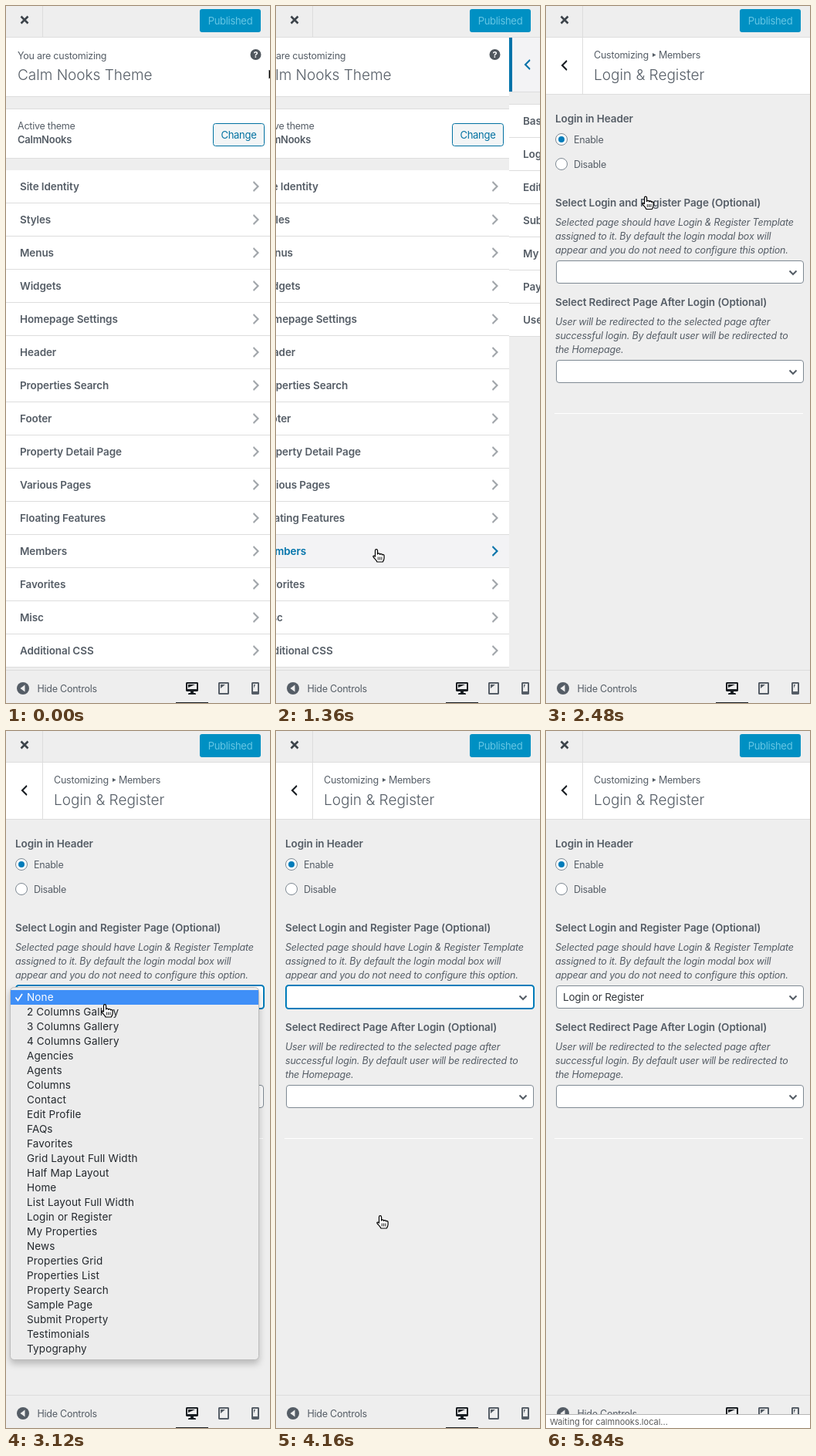
An HTML page for the animation above (6.24 s loop, 342 px wide and 904 px high).

```html
<!DOCTYPE html>
<html lang="en">
<head>
<meta charset="utf-8">
<title>Theme customizer</title>
<style>
  html, body { margin: 0; width: 100%; height: 100%; overflow: hidden; background: #eee; }
  svg { display: block; width: 342px; height: 904px; font-family: Inter, "Open Sans", sans-serif; font-optical-sizing: none; }
  text { fill: #555d66; white-space: pre; }
  .body { font-size: 12.5px; letter-spacing: -.24px; }
  .desc { font-size: 12.5px; letter-spacing: -.2px; font-style: italic; }
  .bold { font-size: 13.5px; letter-spacing: -.1px; font-weight: 600; }
  .name { font-size: 13px; letter-spacing: -.26px; font-weight: 600; }
  .title { font-size: 19px; font-weight: 300; }
  .btn { font-size: 13px; letter-spacing: -.3px; text-anchor: middle; }
  .menu { font-size: 13.5px; letter-spacing: .14px; }
  .value { font-size: 13.5px; letter-spacing: -.2px; }
  .status { font-size: 11px; }
  .help { font-size: 11px; font-weight: 700; text-anchor: middle; }
</style>
</head>
<body>
<svg id="stage" viewBox="0 0 342 904" width="342" height="904"></svg>
<script>
const LOOP = 6240, STEP = 80, W = 342;
const BLUE = '#0073aa', GREY = '#555d66', LINE = '#ddd', BACK = '#eee';

const ROOT = ['Site Identity', 'Styles', 'Menus', 'Widgets', 'Homepage Settings', 'Header',
  'Properties Search', 'Footer', 'Property Detail Page', 'Various Pages', 'Floating Features',
  'Members', 'Favorites', 'Misc', 'Additional CSS'];
const MEMBERS = ['Basic', 'Login & Register', 'Edit Profile', 'Submit Property', 'My Properties',
  'Payments', 'User & Agent/Agency Sync'];
const PAGES = ['None', '2 Columns Gallery', '3 Columns Gallery', '4 Columns Gallery', 'Agencies',
  'Agents', 'Columns', 'Contact', 'Edit Profile', 'FAQs', 'Favorites', 'Grid Layout Full Width',
  'Half Map Layout', 'Home', 'List Layout Full Width', 'Login or Register', 'My Properties', 'News',
  'Properties Grid', 'Properties List', 'Property Search', 'Sample Page', 'Submit Property',
  'Testimonials', 'Typography'];

// Key moments in ms
const AT = { panel: 1320, section: 2210, open: 2880, pick: 3920, close: 4000, value: 4240,
  dirty: 4400, status: 4480, blur: 4880, saving: 4960, saved: 5440, gone: 5840 };

// Pointer tip: time, x, y
const TRACK = [
  [0, 340, 81], [80, 330, 112], [160, 290, 185], [320, 220, 330], [480, 165, 470], [640, 136, 580],
  [836, 128, 632], [858, 130, 700], [950, 130, 698], [960, 129, 665], [1040, 129, 692],
  [1120, 130, 705], [1520, 130, 705], [1920, 130, 199], [2400, 130, 199], [2560, 128, 296],
  [2720, 128, 351], [3040, 128, 351], [3120, 128, 355], [3600, 135, 590], [3840, 135, 629],
  [4400, 135, 629], [4560, 165, 420], [4720, 235, 130], [4880, 268, 18], [5120, 268, 18],
  [5360, 290, 190], [5600, 320, 331], [5680, 320, 331], [5760, 334, 280], [5840, 344, 260]
];

const clamp = v => Math.max(0, Math.min(1, v));
const ease = v => (1 - Math.cos(Math.PI * clamp(v))) / 2;
const esc = s => s.replace(/&/g, '&amp;');

function pointer(t) {
  const i = TRACK.findIndex(k => k[0] > t);
  if (i < 1) return TRACK[i < 0 ? TRACK.length - 1 : 0].slice(1);
  const a = TRACK[i - 1], b = TRACK[i], u = (t - a[0]) / (b[0] - a[0]);
  return [a[1] + (b[1] - a[1]) * u, a[2] + (b[2] - a[2]) * u];
}

function mix(a, b, u) {
  const part = (c, i) => parseInt(c.slice(i, i + 2), 16);
  return `rgb(${[1, 3, 5].map(i => Math.round(part(a, i) + (part(b, i) - part(a, i)) * u))})`;
}

const text = (x, y, cls, s, fill) =>
  `<text x="${x}" y="${y}" class="${cls}"${fill ? ` style="fill:${fill}"` : ''}>${esc(s)}</text>`;
const rect = (x, y, w, h, fill, more = '') =>
  `<rect x="${x}" y="${y}" width="${w}" height="${h}" fill="${fill}" ${more}/>`;
const path = (d, stroke, width = 2, fill = 'none') =>
  `<path d="${d}" fill="${fill}" stroke="${stroke}" stroke-width="${width}"/>`;
const shape = (d, fill) => `<path d="${d}" fill="${fill}" fill-rule="evenodd"/>`;
const shift = (x, s) => `<g transform="translate(${x.toFixed(2)} 0)">${s}</g>`;

function rows(labels, top, t, from) {
  const hover = time => {
    if (time < from) return -1;
    const [x, y] = pointer(time);
    return x < W - 6 ? Math.floor((y - top) / 43) : -1;
  };
  const now = hover(t), past = [1, 2, 3, 4, 5, 6].map(k => hover(t - 25 * k));
  return labels.map((label, i) => {
    const k = past.indexOf(i), lit = k < 0 ? 0 : 1 - k / 6;
    const y = top + 43 * i, arrow = now === i || lit === 1 ? BLUE : '#a0a5aa';
    return rect(0, y, W, 42, mix('#ffffff', '#f3f3f5', lit)) +
      rect(0, y + 42, W, 1, LINE) +
      rect(0, y, 4, 42, mix('#ffffff', BLUE, lit)) +
      text(18, y + 26, 'bold', label, mix(GREY, BLUE, lit)) +
      shape(`M320 ${y + 26}l5 -5l-5 -5l1 -2l7 7l-7 7z`, arrow);
  }).join('');
}

function rootView(t) {
  return rect(0, 41, W, 821, BACK) +
    rect(0, 41, W, 76, '#fff') + rect(0, 117, W, 1, LINE) +
    text(15, 69, 'body', 'You are customizing') + text(15, 96, 'title', 'Calm Nooks Theme') +
    '<circle cx="323.5" cy="63" r="7" fill="#50575e"/>' + text(323.5, 67, 'help', '?', '#fff') +
    rect(0, 133, W, 65, LINE) + rect(0, 134, W, 63, '#fff') +
    text(15, 160, 'body', 'Active theme') + text(15, 178, 'name', 'CalmNooks') +
    rect(268.5, 152.5, 66, 29, '#f3f5f6', 'rx="3" stroke="#0071a1"') +
    text(301.5, 172, 'btn', 'Change', '#0071a1') +
    rows(ROOT, 213, t, 0);
}

function backCell(height, focused) {
  const y = 41 + Math.floor(height / 2);
  return rect(0, 41, W, height, '#fff') + rect(0, 41 + height, W, 1, LINE) +
    (focused ? rect(0, 41, 47, height, '#f3f3f5') + rect(0, 41, 4, height, BLUE) : '') +
    rect(47, 41, 1, height, LINE) +
    shape(`M27.500 ${y - 5}l-5 5l5 5l-1 2l-7 -7l7 -7z`, focused ? BLUE : '#191e23');
}

function membersView(t) {
  return rect(0, 41, W, 821, BACK) + backCell(70, true) +
    text(62, 67, 'body', 'You are customizing') + text(62, 94, 'title', 'Members') +
    rect(0, 127, W, 1, LINE) + rows(MEMBERS, 128, t, AT.panel + 200);
}

function radio(y, label, on) {
  return `<circle cx="20" cy="${y}" r="7.5" fill="#fff" stroke="#7e8993"/>` +
    (on ? `<circle cx="20" cy="${y}" r="4" fill="#007cba"/>` : '') +
    text(36, y + 5, 'body', label);
}

function select(y, value, focused) {
  const box = focused
    ? rect(13, y, 321, 30, '#fff', 'rx="3.5" stroke="#007cba" stroke-width="2"')
    : rect(13.5, y + .5, 320, 29, '#fff', 'rx="3.5" stroke="#7e8993"');
  return box + text(22, y + 20, 'value', value, '#32373c') +
    path(`M315.5 ${y + 13.5}l4.5 4.5l4.5 -4.5`, GREY);
}

const lines = (y, list) => list.map((s, i) => text(12, y + 18 * i, 'desc', s)).join('');

function loginView(t) {
  return rect(0, 41, W, 821, BACK) + backCell(73, false) +
    text(62, 68, 'body', 'Customizing') + shape('M138 61l4.5 2.5l-4.5 2.5z', GREY) +
    text(146, 68, 'body', 'Members') + text(62, 96, 'title', 'Login & Register') +
    text(12, 151, 'bold', 'Login in Header') + radio(173, 'Enable', true) + radio(205, 'Disable') +
    text(12, 260, 'bold', 'Select Login and Register Page (Optional)') +
    lines(285, ['Selected page should have Login & Register Template',
      'assigned to it. By default the login modal box will',
      'appear and you do not need to configure this option.']) +
    select(330, t >= AT.value ? 'Login or Register' : '', t >= AT.open && t < AT.blur) +
    text(12, 389, 'bold', 'Select Redirect Page After Login (Optional)') +
    lines(414, ['User will be redirected to the selected page after',
      'successful login. By default user will be redirected to', 'the Homepage.']) +
    select(459, '', false) + rect(11, 528, 322, 1, '#fff');
}

function menu(t) {
  const alpha = 1 - clamp((t - AT.close) / 150);
  if (t < AT.open || !alpha) return '';
  const [, y] = pointer(t), pick = t === AT.pick ? -1 : Math.max(0, Math.floor((y - 337) / 19));
  const items = PAGES.map((label, i) => {
    const on = i === pick, mid = 345 + 19 * i, ink = on ? '#fff' : '#23282d';
    return (on ? rect(6, mid - 9, 321, 19, '#3f8ff7') : '') +
      (i ? '' : path('M12.5 345.5l3 4l5.5 -8.5', ink, 1.6)) +
      text(27, mid + 5, 'menu', label, ink);
  }).join('');
  return `<g opacity="${alpha}">` + rect(5.5, 332.5, 322, 483, '#ececec',
    'rx="5" stroke="#bcbcbc" style="filter:drop-shadow(0 5px 4px rgba(0,0,0,.22))"') + items + '</g>';
}

function spinner(t) {
  const a = t / 1000 * Math.PI * 2;
  return '<circle cx="223" cy="19" r="9" fill="#9a9da0"/>' +
    `<circle cx="${223 + 5.5 * Math.cos(a)}" cy="${19 + 5.5 * Math.sin(a)}" r="2" fill="#fff"/>`;
}

function header(t) {
  const dirty = t >= AT.dirty && t < AT.saved, saving = t >= AT.saving && t < AT.saved;
  const fill = dirty && !saving ? '#007cba' : '#0090c3', ink = dirty && !saving ? '#fff' : '#66c6e4';
  const button = dirty
    ? rect(235, 4, 95, 30, fill, 'rx="3"') + rect(300, 4, 1, 30, '#006ba1') +
      text(268, 24, 'btn', 'Publish', ink) +
      `<circle cx="315.5" cy="19" r="4.2" fill="none" stroke="${ink}" stroke-width="3"/>` +
      `<circle cx="315.5" cy="19" r="6.3" fill="none" stroke="${ink}" stroke-width="2" stroke-dasharray="2.5 2.45"/>`
    : rect(251, 4, 79, 30, fill, 'rx="3"') + text(290.5, 24, 'btn', 'Published', ink);
  return rect(0, 0, W, 40, BACK) + rect(0, 40, W, 1, LINE) + rect(47, 0, 1, 40, LINE) +
    path('M19.5 13.5l9 9m0 -9l-9 9', '#3c434a', 2.6) + button + (saving ? spinner(t) : '');
}

// Outer frame, screen opening and the corner shine
const device = (x, w, h, bottom, slope) =>
  `M${x + 1} 877h${w - 2}l1 1v${h - 2}l-1 1h${2 - w}l-1 -1v${2 - h}z` +
  `M${x + 2} 879v${h - 2 - bottom}h${w - 4}v${bottom + 2 - h}z` +
  `M${x + 3} 880h${w - 8 + (w > 14 ? 1 : 0)}l${8 - w - (w > 14 ? 1 : 0)} ${slope}z`;

function footer(t) {
  const ink = '#191e23';
  return rect(0, 861, W, 43, BACK) + rect(0, 861, W, 1, LINE) +
    `<circle cx="22" cy="885" r="8" fill="${GREY}"/>` + shape('M24.5 880.5v9l-6 -4.5z', BACK) +
    text(40.5, 890, 'body', 'Hide Controls') +
    shape(device(233, 16, 12, 3, 4), ink) + shape('M239 889h4v2h2l1 1v1h-10v-1l1 -1h2z', ink) +
    shape(device(275, 14, 16, 2, 5), GREY) + shape(device(318, 10, 16, 4, 5), GREY) +
    rect(220, 903, 42, 1, ink) +
    (t < AT.status ? '' : rect(0, 886, W, 18, '#fff') + rect(0, 886, W, 1, '#b5b5b5') +
      text(5, 900, 'status', 'Waiting for calmnooks.local...', '#5a5a5a'));
}

function cursor(t) {
  if (t >= AT.gone) return '';
  const [x, y] = pointer(t), arrow = y < 213 && t < 640 || t >= 5200;
  const d = arrow
    ? 'M0 0V15l3.500 -3.300l2.300 5.300l2.600 -1.100l-2.300 -5.200h4.900z'
    : 'M-1.500 9V1.200Q-1.400 -.4 0 -.4T1.600 1.200V6Q2 4.700 3.300 4.900T4.600 6.400Q5 5.300 6.300 5.600T7.500 7' +
      'Q8 6.200 9.100 6.600T10.100 8.300V11Q10 13.500 8.300 16H1Q0 13.800 -2 11.800T-4.200 8.800Q-3.500 7.200 -1.500 9z';
  return `<g transform="translate(${x.toFixed(1)} ${y.toFixed(1)})" stroke-linejoin="round">` +
    (arrow ? path(d, '#fff', 1.2, '#000')
      : path(d, '#000', 1.2, '#fff') + path('M2.300 9.500v4M4.600 9.500v4M6.900 9.500v4', '#000', .9)) + '</g>';
}

function scene(t) {
  const p = ease((t - AT.panel) / 180), s = ease((t - AT.section) / 180);
  return rect(0, 0, W, 904, BACK) +
    (p < 1 ? shift(-W * p, rootView(t)) : '') +
    (p > 0 && s < 1 ? shift(W * (1 - p - s), membersView(t)) : '') +
    (s > 0 ? shift(W * (1 - s), loginView(t)) : '') +
    header(t) + footer(t) + menu(t) + cursor(t);
}

const stage = document.getElementById('stage');
const start = performance.now();
let shown = -1;
function tick() {
  const t = Math.floor(((performance.now() - start) % LOOP) / STEP) * STEP;
  if (t !== shown) stage.innerHTML = scene(shown = t);
  requestAnimationFrame(tick);
}
tick();
</script>
</body>
</html>
```
